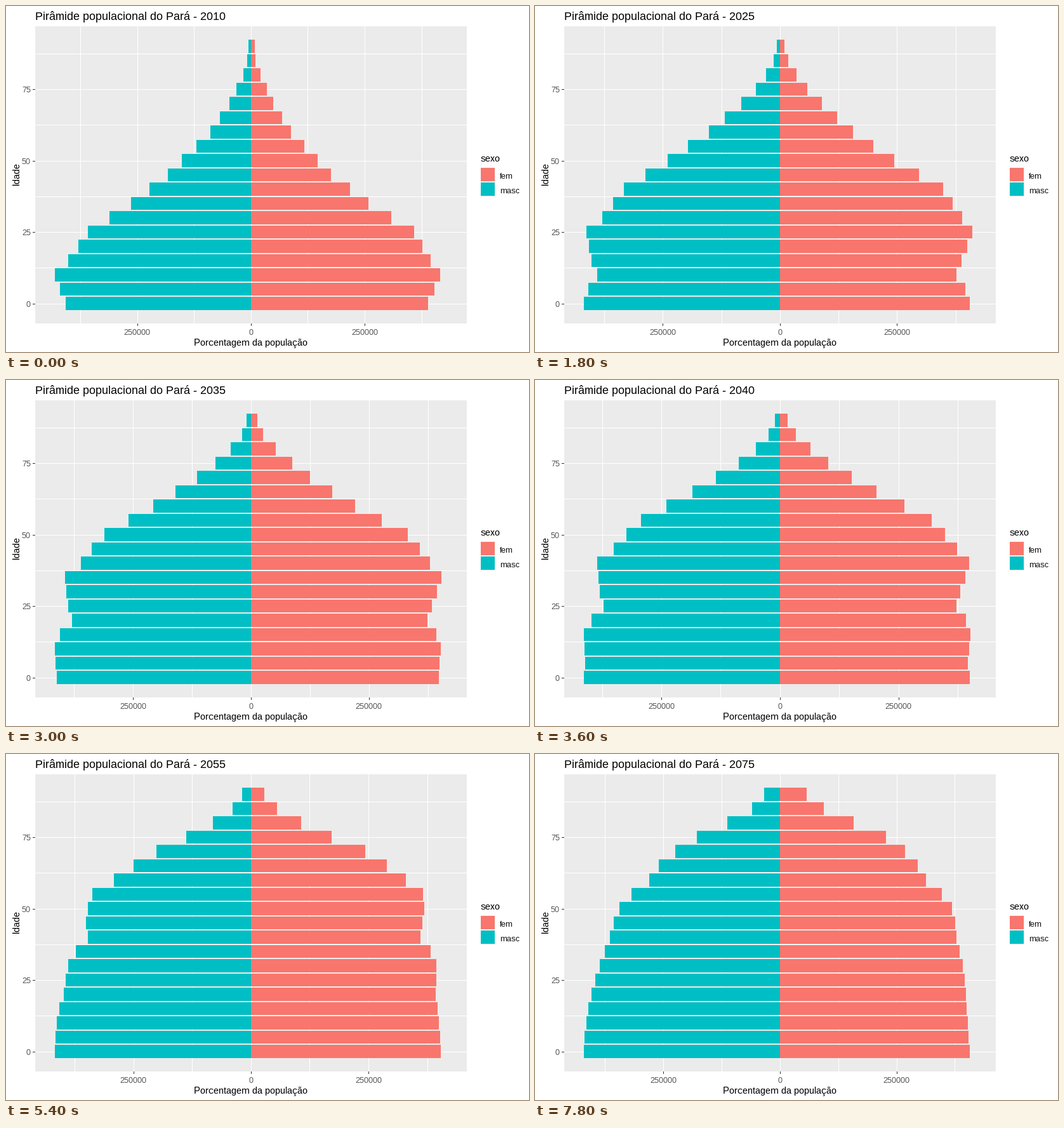
Write a matplotlib script that moves like this. It is 824 px wide and 545 px high and loops after 8 s.

```python
import numpy as np
import matplotlib.pyplot as plt
from matplotlib.animation import FuncAnimation
from matplotlib.patches import Rectangle

W, H, DPI = 824, 545, 64
plt.rcParams.update({
    "font.family": "Liberation Sans",
    "text.hinting": "default",
    "text.hinting_factor": 1,   # whole-pixel glyph advances
    "text.kerning_factor": 6,
})

# Panel edges in pixels; the axes run 10 % wider than the data.
LEFT, RIGHT, TOP, BOTTOM = 46, 726, 32, 500
ZERO = 385.9
REACH = (RIGHT - LEFT) / 2.2
PER_YEAR = (BOTTOM - TOP) / (94.5 * 1.1)

GREY, WHITE = "#EBEBEB", "#FFFFFF"
FEM, MASC = "#F8766D", "#00BFC4"
BLACK, TICK, LABEL = "#000000", "#333333", "#4D4D4D"

YEARS = range(2010, 2080, 5)
AGES = np.arange(0, 95, 5)

# Key points, in thousands of people: the first pyramid and male births.
START_AGES = [0, 10, 15, 25, 35, 45, 60, 70, 80, 85, 90]
START_MEN = [408, 431.5, 402, 358, 264, 183, 89.4, 48, 17, 8.4, 5.6]
START_WOMEN = [390, 416.4, 395.4, 359, 258.5, 176, 88, 49, 21, 9.8, 8.4]
BIRTH_YEARS = [2015, 2020, 2025, 2035, 2050, 2060, 2075]
BIRTHS = [392, 410, 418.6, 411.4, 417.4, 417.3, 420.6]
GIRLS_PER_BOY = 0.967

# Five-year death rates, growing exponentially between the key ages.
RISK_AGES = [0, 10, 15, 35, 40, 60, 80, 90]
RISK_MEN = [0.0025, 0.0075, 0.0177, 0.0258, 0.030, 0.1165, 0.594, 1.2]
RISK_WOMEN = [0.003, 0.0025, 0.0045, 0.0125, 0.0184, 0.0855, 0.48, 1.2]


def project(start, risk, birth_share):
    """Age every cohort five years at a time; the last group is open-ended."""
    survival = np.exp(-np.exp(np.interp(AGES, RISK_AGES, np.log(risk))))
    sizes = np.interp(AGES, START_AGES, start)
    history = [sizes]
    for year in YEARS[1:]:
        alive = sizes * survival
        births = birth_share * np.interp(year, BIRTH_YEARS, BIRTHS)
        sizes = np.concatenate(([births], alive[:-1]))
        sizes[-1] += alive[-1]
        history.append(sizes)
    return history


MEN = project(START_MEN, RISK_MEN, 1)
WOMEN = project(START_WOMEN, RISK_WOMEN, GIRLS_PER_BOY)

fig = plt.figure(figsize=(W / DPI, H / DPI), dpi=DPI, facecolor=WHITE)
ax = fig.add_axes([0, 0, 1, 1])
ax.set_xlim(0, W)
ax.set_ylim(H, 0)
ax.axis("off")


def box(x, y, w, h, color, z=1):
    return ax.add_patch(Rectangle((x, y), w, h, facecolor=color, linewidth=0,
                                  antialiased=False, zorder=z))


def text(x, y, s, px, color=BLACK, ha="left", **kw):
    return ax.text(x, y, s, fontsize=px * 72 / DPI, color=color, ha=ha,
                   va="baseline", zorder=5, **kw)


def age_y(age):
    return BOTTOM - (age + 6.97) * PER_YEAR


# Panel, horizontal grid and age axis
box(LEFT, TOP, RIGHT - LEFT, BOTTOM - TOP, GREY)
for age in np.arange(0, 90, 12.5):
    y = round(age_y(age))
    box(LEFT, y, RIGHT - LEFT, 1, WHITE, 2)
    if age % 25 == 0:
        box(LEFT - 4, y, 4, 1, TICK)
        text(39, y + 5, f"{age:.0f}", 12, LABEL, "right")

# Titles and legend
title = text(LEFT, 22, "", 18)
text(386, 535, "Porcentagem da população", 15, ha="center")
text(21, 265, "Idade", 15, ha="center", rotation=90, rotation_mode="anchor")
text(748, 245, "sexo", 15)
box(748, 254, 23, 46, "#F2F2F2")
for y, name, color in ((255, "fem", FEM), (278, "masc", MASC)):
    box(748, y, 22, 21, color, 2)
    text(778, y + 17, name, 12)

# Population axis: grid lines, ticks and labels at multiples of 250 000
STEPS = np.arange(-1.5, 2, 0.5)
MAJOR = (-1, 0, 1)
grid = [box(0, TOP, 1, BOTTOM - TOP, WHITE, 2) for _ in STEPS]
ticks = [box(0, BOTTOM, 1, 4, TICK) for _ in MAJOR]
labels = [text(0, 518, "250000" if m else "0", 12, LABEL, "center") for m in MAJOR]


def bar_row(age, color):
    top, bottom = round(age_y(age + 2.25)), round(age_y(age - 2.25))
    return box(round(ZERO), top, 0, bottom - top, color, 3)


men_bars = [bar_row(age, MASC) for age in AGES]
women_bars = [bar_row(age, FEM) for age in AGES]


def draw(i):
    k = i // 3      # each year stays for three ticks of the clock
    men, women = MEN[k], WOMEN[k]
    scale = REACH / max(men.max(), women.max())
    title.set_text(f"Pirâmide populacional do Pará - {YEARS[k]}")
    for step, line in zip(STEPS, grid):
        line.set_x(round(ZERO + step * 250 * scale))
    for m, tick, label in zip(MAJOR, ticks, labels):
        x = ZERO + m * 250 * scale
        tick.set_x(round(x))
        label.set_x(x)
    for side, bars, sizes in ((-1, men_bars, men), (1, women_bars, women)):
        for bar, size in zip(bars, sizes):
            bar.set_width(round(ZERO + side * size * scale) - round(ZERO))
    return []


anim = FuncAnimation(fig, draw, frames=40, interval=200, repeat=True,
                     repeat_delay=0, blit=False)
plt.show()
```
